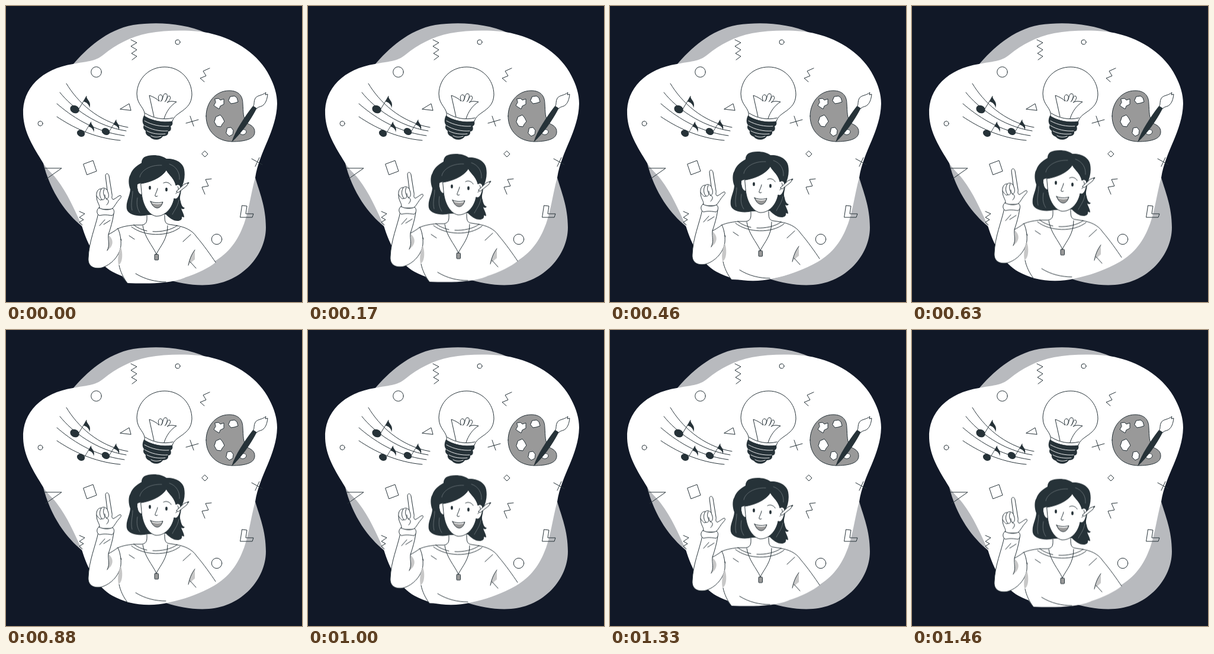
These frames come from a looping animation (500 by 500 pixels, 1500 ms). An HTML page:

```html
<!DOCTYPE html>
<html lang="en">
<head>
<meta charset="utf-8">
<title>Creative thinking</title>
<style>
  html, body { margin: 0; width: 100%; height: 100%; overflow: hidden; background: #111827; }
  svg { display: block; width: 100vw; height: 100vh; }
  .line, .skin, .mid { stroke: #263238; stroke-width: 1; stroke-linecap: round; stroke-linejoin: round; }
  .line { fill: none; }
  .skin { fill: #fff; }
  .mid { fill: #999; }
  .white { fill: #fff; }
  .ink { fill: #263238; }
  .shade { fill: #c7c7c7; }
  .gap { fill: none; stroke: #fff; stroke-width: .9; stroke-linecap: round; }
  .shine { fill: none; stroke: #7d868a; stroke-width: .7; stroke-linecap: round; }
  .woman { animation: float 1.5s linear infinite; }
  @keyframes float { 50% { transform: translateY(-10px); } }
</style>
</head>
<body>
<svg viewBox="0 0 500 500">
  <defs>
    <g id="note">
      <ellipse class="ink" rx="8" ry="6.5" transform="rotate(28)"/>
      <path class="line" d="M6 1 L20 -22"/>
      <path class="ink" d="M20 -23 C20 -15 29 -14 25 -2 C25 -8 20 -12 15 -13 Z"/>
    </g>
  </defs>

  <!-- backdrop -->
  <path fill="#b8babe" d="M113 99 C135 73 170 40 215 32 C258 26 302 30 337 45 L421 290 C428 314 439 339 439 374 C439 421 398 467 343 471 C318 473 292 468 270 461 L128 372 C104 352 75 317 62 262 Z"/>
  <path class="white" d="M29 183 C27 139 61 106 113 98 C136 93 149 95 165 82 C186 65 210 52 240 46 C275 40 320 40 348 47 C388 56 428 83 445 118 C453 133 458 149 458 165 C457 211 428 245 421 290 C413 318 410 352 398 378 C386 406 368 424 342 437 C320 448 300 455 276 460 C240 469 205 463 180 449 C155 435 138 405 128 371 C115 342 104 317 86 293 C78 282 69 276 62 264 C47 239 30 214 29 183 Z"/>

  <!-- scattered marks -->
  <g class="line">
    <path d="M211 57 L221 62 L211 68 L221 74 L212 80 L221 85 L213 91"/>
    <path d="M344 105 L333 110 L338 118 L328 122 L335 128"/>
    <path d="M336 318 L331 306 L342 304 L337 293 L347 292"/>
    <path d="M124 347 L133 351 L124 357 L131 361 L124 365 L129 370"/>
    <circle cx="290" cy="61" r="4"/>
    <circle cx="152.5" cy="111.5" r="8.8"/>
    <circle cx="58" cy="198.5" r="4"/>
    <circle cx="356" cy="394" r="8.7"/>
    <path d="M193 174 L208 165 L211 176 Z"/>
    <path d="M131 267 L147 261 L153 279 L137 285 Z"/>
    <path d="M336 245 L341 250 L336 255 L331 250 Z"/>
    <path d="M304 198 L325 192 M311 186 L317 203"/>
    <path d="M415 258 L433 268 M428 256 L421 271"/>
    <path d="M399 337 L407 338 L405 351 L418 351 L416 357 L396 357 Z"/>
    <path d="M64 274 L94 274 L67 293"/>
  </g>

  <!-- music -->
  <g class="line">
    <path d="M102 131 C120 161 155 196 206 205"/>
    <path d="M91 146 C112 172 152 203 203 211"/>
    <path d="M86 165 C108 184 146 212 200 219"/>
    <path d="M86 187 C111 204 148 223 193 227"/>
  </g>
  <use href="#note" transform="translate(116 174.5)"/>
  <use href="#note" transform="translate(168.5 212) scale(.88)"/>
  <use href="#note" transform="translate(126.5 215) scale(.86)"/>

  <!-- bulb -->
  <path class="skin" d="M234 187 C237 172 221 169 221 148 C222 122 242 103 268 103 C294 103 314 124 314 150 C313 178 285 178 281 195 C265 198 247 194 234 187 Z"/>
  <path class="line" d="M235 181 C249 190 266 193 282 189 M250 187 L242 151 C248 153 254 156 259 161 C255 153 259 149 262 150 C266 152 264 160 261 161 C266 160 264 147 270 148 C275 149 271 160 268 162 C272 160 272 151 276 152 C280 154 276 161 272 163 C277 160 283 161 288 162 C278 168 271 178 267 190"/>
  <path class="ink" d="M233 185 C247 194 264 197 281 195 C282 199 281 202 278 203 C280 208 278 212 274 212 C275 217 271 220 265 220 C261 227 248 228 243 221 C237 219 235 214 236 211 C232 208 231 205 233 201 C229 196 231 189 233 185 Z"/>
  <path class="gap" d="M234 194 C246 201 262 204 275 203 M234 202 C245 209 260 212 273 211 M238 211 C247 216 258 217 269 216 M245 219 C250 222 256 222 262 220"/>

  <!-- palette and brush -->
  <path class="mid" d="M338 186 C338 164 353 143 377 143 C393 143 400 152 400 165 C401 178 400 190 407 198 C413 201 421 204 420 214 C419 226 400 229 383 229 C356 229 338 211 338 186 Z"/>
  <g class="skin">
    <path d="M353 157 L359 156 L362 159 L368 157 L368 166 L362 169 L360 174 L355 171 L351 168 L354 163 Z"/>
    <path d="M379 153 L386 152 L390 155 L392 162 L386 164 L380 165 L376 160 Z"/>
    <path d="M355 187 L362 184 L366 189 L369 195 L365 200 L363 204 L356 203 L352 196 Z"/>
    <path d="M374 206 L380 205 L384 210 L383 217 L377 220 L372 215 Z"/>
    <path d="M397 210 C403 206 408 211 405 215 C402 219 394 218 395 213 Z"/>
  </g>
  <path class="ink" d="M381 230 C387 211 403 187 417 169 L423.500 173 C412 195 397 216 381 230 Z"/>
  <path class="skin" d="M418 169 C420 166 418 161 421 156 C425 150 432 152 439 146 L438 150 L442 149 C441 158 439 163 435 167 C431 171 427 169 424 173 Z"/>

  <!-- woman -->
  <g class="woman">
    <!-- jumper -->
    <path class="white" d="M293 374 C309 377 319 387 326 396 C337 408 347 422 354 433 C343 442 324 452 301 459 Z"/>
    <path class="white" d="M189 376 C199 372 218 369 237 369 L270 370 C286 371 309 377 318 388 L318 412 C310 428 311 447 302 459 C275 470 236 469 205 468 C197 458 185 440 180 426 Z"/>
    <path class="shade" d="M319 412 C314 419 310 426 309 436 L319 428 Z"/>
    <path class="line" d="M189 376 C198 372 208 371 216 370 M288 371 C301 373 314 378 322 390 C334 404 346 421 354 433 M319 412 C313 420 310 428 308 438 M205 468 C198 459 193 448 191 438 M219 452 C235 462 253 466 270 466 M311 432 L321 443 M188 376 C190 381 192 390 195 396 M312 386 L299 398 M208 388 L217 394"/>

    <!-- neck and necklace -->
    <path class="white" d="M237 345 L237 370 L216 370 C235 383 270 385 289 371 L269 369 L269 342 Z"/>
    <path class="line" d="M238 354 C238 362 239 368 230 370 L216 370 M268 353 C268 362 268 368 276 369 L289 371 M212 373 C232 389 273 391 294 374 M216 370 C222 375 230 378 238 380 M248 381 C262 382 280 378 289 371"/>
    <path class="line" d="M231 371 C234 391 247 404 254 419 C261 405 273 394 273 371"/>
    <rect class="mid" x="251" y="419.500" width="6.500" height="9.500" rx="1"/>

    <!-- raised arm -->
    <path class="skin" d="M156 350 C151 374 140 398 139 426 C138 440 149 445 162 442 C178 437 192 422 194 405 C195 394 192 382 189 376 C182 381 177 384 173 386 C177 374 180 364 182 351 Z"/>
    <path class="shade" d="M173 387 C182 394 183 405 170 414 C175 404 175 396 173 387 Z M194 407 C199 422 195 437 190 437 C188 427 190 416 194 407 Z"/>
    <path class="line" d="M173 386 C172 398 176 403 171 413 M167 361 L158 371 M176 362 L165 369"/>
    <path class="skin" d="M158 343 C159 334 153 333 153 321 C152 314 156 308 161 309 C164 306 169 308 171 311 L168 287 C168 282 173 282 174 287 L179 318 C180 322 177 324 181 327 C186 325 189 321 193 320 C196 321 194 324 191 327 C187 331 184 338 179 343 Z"/>
    <path class="line" d="M161 309 C157 315 158 323 162 327 C166 329 168 323 167 319 M166 309 C163 315 165 321 169 325 C173 327 174 321 173 317 L171 311 M153 321 C156 325 159 330 162 327 M169 326 C175 327 174 332 170 336"/>
    <path class="skin" d="M157 341 C152 344 153 352 158 354 C165 352 173 353 179 354 C183 352 184 345 180 342 C174 345 165 345 157 341 Z"/>

    <!-- hair and face -->
    <path class="ink" d="M234 255 C243 250 263 251 271 258 C285 257 299 264 301 276 C303 287 301 298 296 308 C296 318 292 323 295 330 C296 336 298 340 302 341 C300 344 298 343 296 342 C298 348 301 352 301 357 L297 356 C298 360 295 363 290 363 C282 363 276 358 270 352 L240 353 C228 356 207 355 204 343 C202 331 209 322 210 310 C206 300 207 289 210 285 C213 276 220 270 229 265 C229 260 231 257 234 255 Z"/>
    <path class="skin" d="M229 300 C223 295 220 302 222 309 C223 316 227 319 230 319 Z"/>
    <path class="skin" d="M228 300 C242 298 262 291 271 277 C275 286 285 290 287 303 C293 299 297 305 294 315 C292 323 288 328 284 325 C281 342 268 356 253 355 C239 352 230 333 229 315 Z"/>
    <path class="ink" d="M222 301 C221 285 230 270 251 265 L273 273 C264 286 248 294 232 298 Z"/>
    <path class="ink" d="M270 275 C274 285 282 288 287 303 C292 299 295 301 297 298 C295 284 285 272 270 275 Z"/>
    <path class="shine" d="M226 289 C228 278 243 268 263 269 M276 267 C288 271 294 282 293 293 M214 313 C214 325 210 333 213 345 M222 324 C220 336 222 343 226 349 M292 328 C290 339 285 344 281 352"/>

    <!-- features -->
    <g class="ink">
      <ellipse cx="243" cy="307" rx="1.900" ry="3.300"/>
      <ellipse cx="271" cy="310" rx="1.900" ry="3.300"/>
    </g>
    <path class="line" d="M266 299 C271 296 277 299 279 303 M256 308 C255 314 251 319 252 321 C253 322 255 322 256 321 M290 305 C293 309 290 313 287 317"/>
    <path class="mid" d="M244 330 C250 333 259 333 265 331 C263 338 259 342 254 341 C249 340 246 335 244 330 Z"/>
    <path class="white" d="M246 331.500 C252 333.500 258 333.500 264 332 L262 334 C257 335 251 335 247 333 Z"/>

    <!-- pencil -->
    <path class="skin" d="M288 313 L301 301 L309 298 L305 304 L291 315 Z"/>
    <path class="ink" d="M306 299 L309.500 298 L307 301 Z"/>
  </g>
</svg>
</body>
</html>
```
